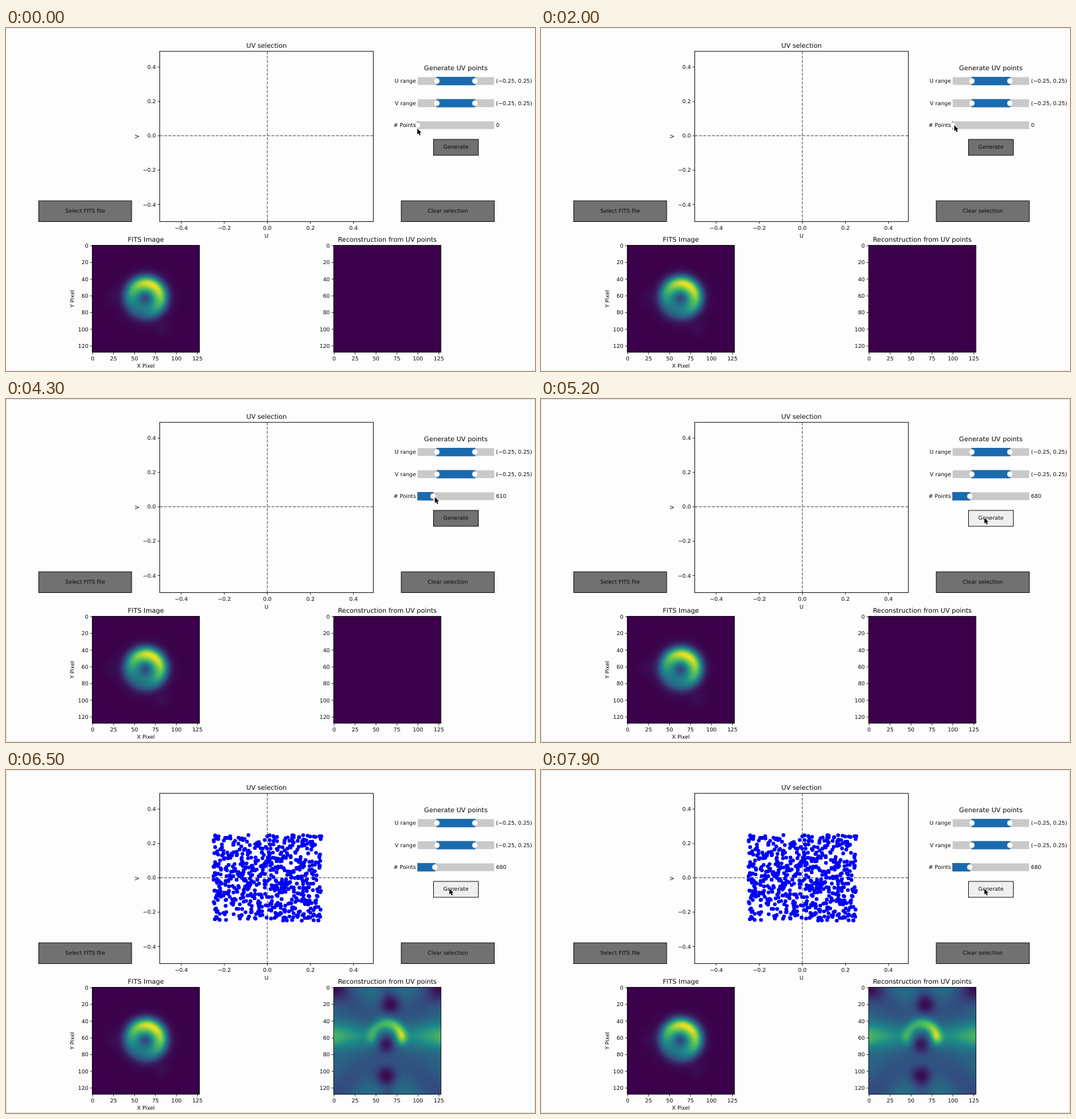
Animation, 800 px wide and 520 px high, one loop 8 s. Source, as an HTML page with a canvas:

```html
<!DOCTYPE html>
<html lang="en">
<head>
<meta charset="utf-8">
<title>UV selection</title>
<style>
html, body { margin: 0; width: 800px; height: 520px; overflow: hidden; background: #fdfdfd; }
canvas { display: block; width: 800px; height: 520px; }
</style>
</head>
<body>
<canvas id="stage" width="800" height="520"></canvas>
<script>
const LOOP = 8000, STEP = 100;
const ctx = document.getElementById('stage').getContext('2d');
const PT = 0.8175, TEXT = 10 * PT, TITLE = 12 * PT;
const INK = '#0a0a0a', PAPER = '#fdfdfd', GRAY = '#717171', TRACK = '#c9c9c9', BLUE = '#1a6aae';
const N = 128, SIDE = 162.2, CELL = SIDE / N, TOP = 329.4;

// ---------- helpers ----------
const clamp = v => Math.max(0, Math.min(1, v));
const mix = (a, b, k) => a + (b - a) * k;
const ramp = (t, from, to) => clamp((t - from) / (to - from));
const ease = v => v * v * (3 - 2 * v);
const bell = (d, s) => Math.exp(-d * d / (2 * s * s));
const blob = (x, y, cx, cy, s) => bell(Math.hypot(x - cx, y - cy), s);

function text(str, x, y, size = TEXT, align = 'center') {
  ctx.font = size + 'px "DejaVu Sans", sans-serif';
  ctx.textAlign = align;
  ctx.fillStyle = INK;
  ctx.fillText(str, x, y + size * 0.36);
}

function sideText(str, x, y) {
  ctx.save();
  ctx.translate(x, y);
  ctx.rotate(-Math.PI / 2);
  text(str, 0, 0);
  ctx.restore();
}

function line(x1, y1, x2, y2, width, color) {
  ctx.beginPath();
  ctx.moveTo(x1, y1);
  ctx.lineTo(x2, y2);
  ctx.lineWidth = width;
  ctx.strokeStyle = color;
  ctx.stroke();
}

function dot(x, y, r, color) {
  ctx.beginPath();
  ctx.arc(x, y, r, 0, 7);
  ctx.fillStyle = color;
  ctx.fill();
}

function box(x, y, w, h, width = 0.9, color = INK) {
  ctx.lineWidth = width;
  ctx.strokeStyle = color;
  ctx.strokeRect(x, y, w, h);
}

function tickX(x, y, label) {
  line(x, y, x, y + 3.2, 0.8, INK);
  text(label, x, y + 9.3);
}

function tickY(x, y, label) {
  line(x - 3.2, y, x, y, 0.8, INK);
  text(label, x - 5.8, y, TEXT, 'right');
}

// ---------- heat maps ----------
const STOPS = ['3b0049', '34497f', '1c888a', '56c35a', 'fde41f'].map(hex =>
  [0, 2, 4].map(i => parseInt(hex.slice(i, i + 2), 16)));

function shade(v) {
  const p = clamp(v) * 4, i = Math.min(3, Math.floor(p));
  return STOPS[i].map((c, j) => mix(c, STOPS[i + 1][j], p - i));
}

function heatMap(left, field) {
  const cv = document.createElement('canvas');
  cv.width = cv.height = N;
  const g = cv.getContext('2d'), img = g.createImageData(N, N);
  for (let j = 0; j < N; j++) for (let i = 0; i < N; i++) {
    const v = field(left + (i + 0.5) * CELL, TOP + (j + 0.5) * CELL);
    img.data.set([...shade(v), 255], (j * N + i) * 4);
  }
  g.putImageData(img, 0, 0);
  return cv;
}

// Ring brightest at the upper right, inside a faint haze
function ringField(x, y) {
  const dx = x - 211, dy = y - 409.5, r = Math.hypot(dx, dy), R = 22.5;
  const swing = 0.3 * Math.cos(Math.atan2(dy, dx) + 1.1) * Math.min(1, r / R);
  const ring = (0.62 + swing) * bell(r - R, r < R ? 12.5 : 8.3);
  const haze = 0.1 * bell(r, 24) + 0.04 * blob(x, y, 237, 457, 8) + 0.03 * blob(x, y, 160, 408, 10);
  return ring + haze;
}

// Bright band and arch, three dark spots in a column, diagonal ripples
function waveField(x, y) {
  const u = Math.abs(x - 577) / 81, v = (y - 410) / 81;
  const dx = (x - 575) / 23, dy = (y - 409) / 25;
  const band = 0.38 * (0.35 + 0.65 * u * u) * bell(v + 0.08, 0.16);
  const arch = (0.36 + 0.14 * dx) * bell(Math.hypot(dx, dy) - 1, 0.26) * ease(ramp(y, 425, 401));
  const spots = blob(x, y, 581, 355, 11) + blob(x, y, 575, 414, 10) + blob(x, y, 575, 464, 11);
  const corners = blob(u, v, 1, -1, 0.18);
  const ripple = 0.07 * Math.abs(v) * Math.cos(5 * (u - Math.abs(v)));
  return 0.32 + band + arch - 0.34 * spots - 0.22 * corners - ripple;
}

const LEFT = 130.4, RIGHT = 495.6;
const ringMap = heatMap(LEFT, ringField);
const waveMap = heatMap(RIGHT, waveField);

function imagePlot(x, map, title) {
  if (map) {
    ctx.drawImage(map, x, TOP, SIDE, SIDE);
  } else {
    ctx.fillStyle = `rgb(${shade(0)})`;
    ctx.fillRect(x, TOP, SIDE, SIDE);
  }
  box(x, TOP, SIDE, SIDE);
  for (let v = 0; v < N; v += 25) tickX(x + (v + 0.5) * CELL, TOP + SIDE, v);
  for (let v = 0; v < N; v += 20) tickY(x, TOP + (v + 0.5) * CELL, v);
  text(title, x + SIDE / 2, 320.4, TITLE);
}

// ---------- UV plot ----------
const uvX = u => 395.3 + u * 325.6;
const uvY = v => 163.4 - v * 260.4;

let seed = 20;
const rand = () => (seed = (seed * 16807) % 2147483647) / 2147483647;
const points = Array.from({ length: 680 }, () => [rand() / 2 - 0.25, rand() / 2 - 0.25]);

function uvPlot(filled) {
  const l = 232.5, t = 35.3, w = 323, h = 258.2;
  ctx.setLineDash([3.7, 1.6].map(k => k * 1.5 * PT));
  line(l, uvY(0), l + w, uvY(0), 1.5 * PT, '#6f6f6f');
  line(uvX(0), t + h, uvX(0), t, 1.5 * PT, '#6f6f6f');
  ctx.setLineDash([]);
  if (filled) for (const [u, v] of points) dot(uvX(u), uvY(v), 3.5 * PT, '#0000fa');
  box(l, t, w, h);
  for (let i = -2; i <= 2; i++) {
    const v = i / 5, label = v.toFixed(1).replace('-', '\u2212');
    tickX(uvX(v), t + h, label);
    tickY(l, uvY(v), label);
  }
  text('UV selection', l + w / 2, 26.6, TITLE);
  text('U', l + w / 2, 315);
  sideText('V', 198.3, t + h / 2);
}

// ---------- widgets ----------
const BAR = { x: 622.5, w: 115.7, h: 11.8 };

function slider(label, y, from, to, value, knobs) {
  const at = f => BAR.x + f * BAR.w, top = y - BAR.h / 2;
  ctx.fillStyle = TRACK;
  ctx.fillRect(BAR.x, top, BAR.w, BAR.h);
  ctx.fillStyle = BLUE;
  ctx.fillRect(at(from), top, (to - from) * BAR.w, BAR.h);
  box(at(from), top, (to - from) * BAR.w, BAR.h, PT, BLUE);
  if (knobs.length === 1) line(BAR.x, top, BAR.x, top + BAR.h, 0.7, 'rgba(200,40,40,.5)');
  for (const f of knobs) {
    dot(at(f), y, 4.5, '#c4c4c4');
    dot(at(f), y, 3.8, PAPER);
  }
  text(label, 620, y - 0.2, TEXT, 'right');
  text(value, 741, y - 0.2, TEXT, 'left');
}

function button(label, x, y, w, h, color = GRAY) {
  ctx.fillStyle = color;
  ctx.fillRect(x, y, w, h);
  box(x, y, w, h);
  text(label, x + w / 2, y + h / 2 - 0.4);
}

function cursor(x, y) {
  ctx.save();
  ctx.translate(x, y);
  const arrow = new Path2D('M0 0V8.8L2 7 3.5 10.3 5 9.6 3.6 6.5 6.2 6.3Z');
  ctx.lineJoin = 'round';
  ctx.lineWidth = 1.2;
  ctx.strokeStyle = PAPER;
  ctx.stroke(arrow);
  ctx.fillStyle = '#000';
  ctx.fill(arrow);
  ctx.restore();
}

// ---------- timeline ----------
function draw(t) {
  const drag = ramp(t, 2320, 4500);
  const count = Math.floor(drag * 68) * 10;
  const reach = ease(ramp(t, 500, 1200)), leave = ease(ramp(t, 4700, 5200));
  const mx = mix(mix(622, 625, reach) + 26 * drag, 670.5, leave);
  const my = mix(mix(152.5, 147.5, reach) + 1.5 * drag, 180, leave);
  const done = t >= 5500;

  ctx.fillStyle = PAPER;
  ctx.fillRect(0, 0, 800, 520);
  line(0, 0.5, 800, 0.5, 1, '#ebebeb');
  line(0, 519.5, 800, 519.5, 1, '#ebebeb');
  if (t >= 2500) box(0.5, 0.5, 799, 519, 1, '#e2e2e2');

  uvPlot(done);
  imagePlot(LEFT, ringMap, 'FITS Image');
  text('X Pixel', LEFT + SIDE / 2, 512.4);
  sideText('Y Pixel', 100.2, TOP + SIDE / 2);
  imagePlot(RIGHT, done ? waveMap : null, 'Reconstruction from UV points');

  text('Generate UV points', 680.3, 60.1, TITLE);
  const range = '(\u22120.25, 0.25)';
  slider('U range', 80.4, 0.25, 0.75, range, [0.25, 0.75]);
  slider('V range', 114, 0.25, 0.75, range, [0.25, 0.75]);
  slider('# Points', 147.4, 0, count / 3000, count, [count / 3000]);

  button('Select FITS file', 49.5, 262, 140.5, 31.5);
  button('Clear selection', 597.8, 262, 140.7, 31.5);
  button('Generate', 646.5, 168.9, 67.8, 24.1, my > 169 ? '#efefef' : GRAY);
  cursor(mx, my);
}

ctx.textRendering = 'geometricPrecision';
const start = performance.now();
function tick() {
  const t = (performance.now() - start) % LOOP;
  draw(Math.floor(t / STEP) * STEP);
  requestAnimationFrame(tick);
}
tick();
</script>
</body>
</html>
```
